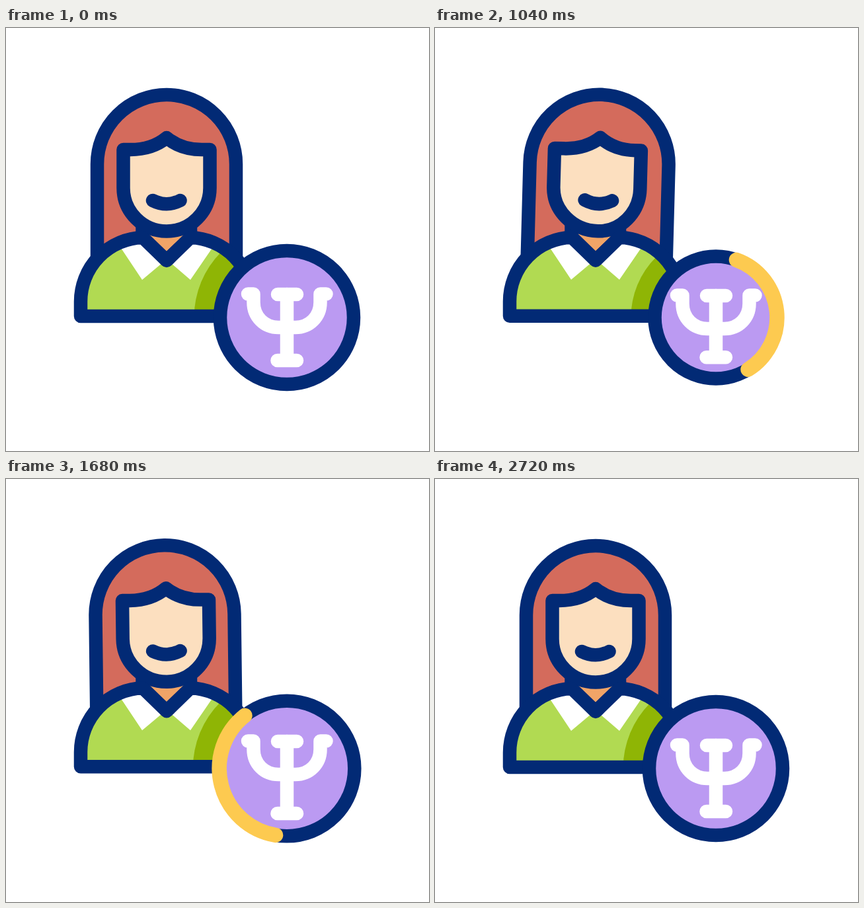
Recreate the animation shown at these times as an HTML page. Size 640 by 640 pixels, loop 3 s.

```html
<!DOCTYPE html>
<html lang="en">
<head>
<meta charset="utf-8">
<title>Psychologist icon</title>
<style>
  html, body { margin: 0; width: 100%; height: 100%; overflow: hidden; background: #fff; }
  svg { display: block; width: 100%; height: 100%; }
  .line { stroke: #022a75; stroke-width: 20.5; stroke-linejoin: round; }
  .open { fill: none; stroke-linecap: round; stroke-linejoin: round; }
</style>
</head>
<body>
<svg viewBox="0 0 640 640">
  <defs>
    <path id="torso" d="M113 436V414A97 97 0 0 1 207 317L243 352L279 317A97 97 0 0 1 373 414V436Z"/>
    <clipPath id="torsoClip"><use href="#torso"/></clipPath>
  </defs>
  <g id="person">
    <path id="hair" class="line" fill="#d46b5c" d="M138 361V206A105 105 0 0 1 348 206V361"/>
    <path class="line" fill="#f1a467" d="M206.5 285V318L243 352L279 318V285"/>
    <g id="head">
      <path id="face" class="line" fill="#fcdfbf"/>
      <path id="mouth" class="line open" d="M222 261Q243 271.5 263.5 261"/>
    </g>
    <use href="#torso" fill="#b1da52"/>
    <g clip-path="url(#torsoClip)">
      <path fill="#fff" d="M172 330L206 381L243 350L279 381L314 330L279 300H207Z"/>
      <circle id="shade" cx="425" fill="#8fb505"/>
    </g>
    <use href="#torso" class="line" fill="none"/>
  </g>
  <circle id="disc" class="line" cx="425" cy="438" fill="#bb9af2"/>
  <path id="band" class="open" stroke="#fdca50" stroke-width="22.5"/>
  <g class="open" stroke="#fff" stroke-width="20.5">
    <path id="fork" d="M366 402.5H374.5V415C374.5 437 391 453 412 453H438C459 453 475.5 437 475.5 415V402.5H484.5M411 403H440"/>
    <path id="stem"/>
  </g>
</svg>
<script>
const LOOP = 3000, START = 130, CX = 425, CY = 438;
const $ = id => document.getElementById(id);
const set = (id, name, value) => $(id).setAttribute(name, value);
const clamp = x => Math.min(1, Math.max(0, x));
const ease = x => (1 - Math.cos(Math.PI * clamp(x))) / 2;

// Eased swing from rest through [time, value] extremes and back to rest at the end
function swing(end, ...peaks) {
  const keys = [[START, 0], ...peaks, [end, 0]];
  return t => keys.slice(1).reduce((sum, [time, value], i) => {
    const [t0, v0] = keys[i];
    return sum + (value - v0) * ease((t - t0) / (time - t0));
  }, 0);
}

const bob = swing(2720, [690, 13], [1365, -12], [2040, 13]);
const tilt = swing(2440, [645, -4.9], [1340, 5.7], [1950, -5.1]);
const turn = swing(2640, [780, 9.5], [1410, -7.5], [1960, 9.3]);
const pulse = swing(2480, [640, 7.5], [1070, -8.7], [1430, 7.3], [2040, -9.2]);
const forkY = swing(2720, [700, -14.6], [1120, 3.5], [1420, -9.3], [2200, 4.2]);
const footY = swing(2720, [700, 11], [1120, -6.3], [1420, 6.3], [2200, -6.6]);

// Fringe, chin and mouth slide sideways as the head turns; the cheeks stay
function facePath(p) {
  const x = 243 + p, left = x - 0.55 * (x - 177.5), right = x + 0.55 * (308.5 - x);
  return `M177.5 184H${x - 55}C${x - 30} 184 ${x - 12} 176 ${x} 166` +
    `C${x + 12} 176 ${x + 30} 184 ${x + 53} 184H308.5V242` +
    `C308.5 278 ${right} 307.5 ${x} 307.5S177.5 278 177.5 242Z`
      .replace(`S`, `C${left} 307.5 `);
}

// The band runs anticlockwise once round, from the bottom of the disc
function bandPath(t, r) {
  const x = clamp((t - 760) / 1100);
  const lead = 360 * (1 - (1 - x) ** 2), tail = 120 * (x + 2 * x ** 4);
  if (lead - tail < 0.5) return '';
  const at = deg => {
    const a = (180 - deg) * Math.PI / 180;
    return `${CX + r * Math.sin(a)} ${CY - r * Math.cos(a)}`;
  };
  return `M${at(tail)}A${r} ${r} 0 ${lead - tail > 180 ? 1 : 0} 0 ${at(lead)}`;
}

function draw(t) {
  const y = bob(t), angle = tilt(t), p = turn(t), r = 101 + pulse(t);
  const top = forkY(t), foot = 503 + footY(t);
  set('person', 'transform', `translate(0 ${y})`);
  set('hair', 'transform', `rotate(${angle} 243 412)`);
  set('head', 'transform', `rotate(${angle} 243 310)`);
  set('face', 'd', facePath(p));
  set('mouth', 'transform', `translate(${p} 0)`);
  set('shade', 'cy', CY - y);
  set('shade', 'r', r * 1.39);
  set('disc', 'r', r);
  set('band', 'd', bandPath(t, r));
  set('fork', 'transform', `translate(0 ${top})`);
  set('stem', 'd', `M425 ${403 + top}V${foot}M410.5 ${foot}H440`);
}

const start = performance.now();
function tick() {
  draw((performance.now() - start) % LOOP);
  requestAnimationFrame(tick);
}
tick();
</script>
</body>
</html>
```
